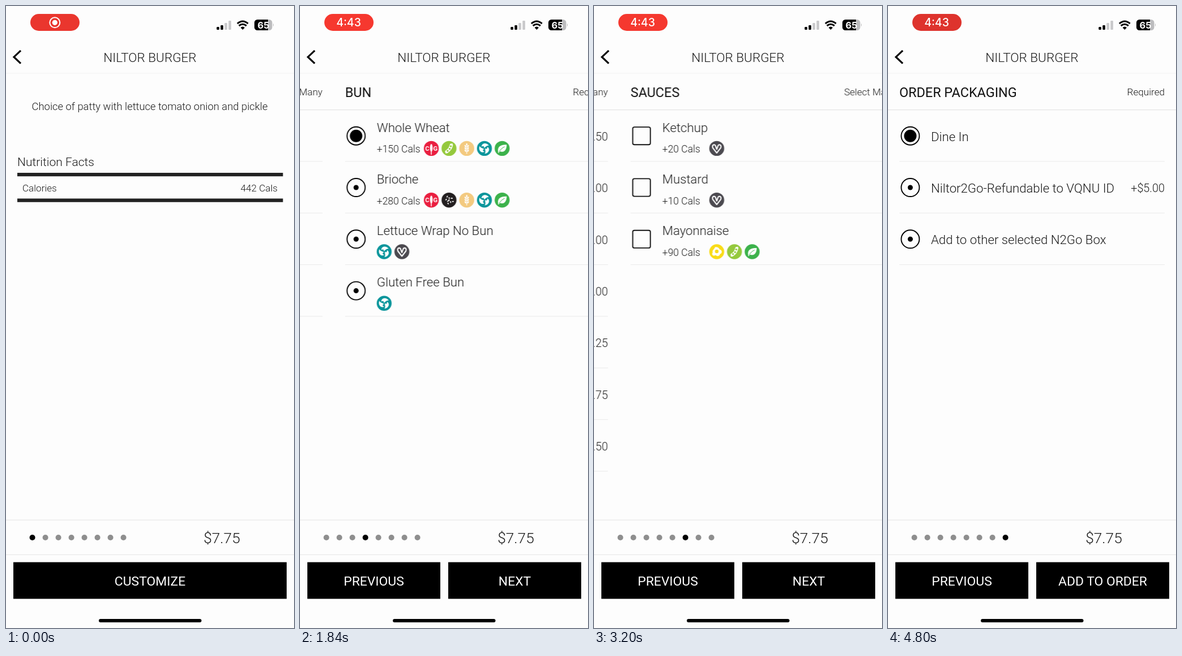
Write an HTML page that moves like this. It is 509x1100 px and loops after 4.88 s.

```html
<!DOCTYPE html>
<html lang="en">
<head>
<meta charset="utf-8">
<title>Burger order</title>
<style>
html, body { margin: 0; width: 100%; height: 100%; overflow: hidden; background: #fdfdfd; }
svg { display: block; width: 100%; height: 100%; }
text { font-family: Roboto, sans-serif; font-weight: 300; fill: #1c1c1c; }
.title { font-size: 22.5px; }
.name { font-size: 22.2px; }
.head { font-size: 23.4px; font-weight: 400; fill: #111; }
.desc { font-size: 18.4px; }
.cals { font-size: 17.5px; }
.note { font-size: 17.1px; }
.cost { font-size: 19.8px; }
.facts { font-size: 21px; }
.total { font-size: 26.3px; }
.button { font-size: 22.9px; font-weight: 400; fill: #fff; }
.clock { font: 500 19.5px Inter, sans-serif; fill: #fff; }
.charge { font: 700 16.5px Inter, sans-serif; fill: #fff; }
.letter { font: 700 11px Roboto, sans-serif; fill: #fff; }
</style>
</head>
<body>
<svg id="stage" viewBox="0 0 509 1100"></svg>
<script>
const LOOP = 4880, WIDTH = 509, SLIDE = 300;
const TOP = 183.5, ROW = 91.3;
const starts = Array.from({ length: 7 }, (_, i) => 316.3 + 672.9 * i);

const text = (x, y, cls, str, anchor = 'start') =>
  `<text x="${x}" y="${y}" class="${cls}" text-anchor="${anchor}">${str}</text>`;
const rect = (x, y, w, h, fill, r = 0, extra = '') =>
  `<rect x="${x}" y="${y}" width="${w}" height="${h}" rx="${r}" fill="${fill}" ${extra}/>`;
const circle = (x, y, r, fill, extra = '') =>
  `<circle cx="${x}" cy="${y}" r="${r}" fill="${fill}" ${extra}/>`;
const path = (d, fill = '#fff', extra = '') => `<path d="${d}" fill="${fill}" ${extra}/>`;
const line = (d, width, color = '#fff') =>
  path(d, 'none', `stroke="${color}" stroke-width="${width}" stroke-linecap="round" stroke-linejoin="round"`);
const turn = (angle, body) => `<g transform="rotate(${angle})">${body}</g>`;
const grain = (x, y, angle, rx = 1.2, ry = 2.2) =>
  `<ellipse rx="${rx}" ry="${ry}" fill="#fff" transform="translate(${x} ${y}) rotate(${angle})"/>`;

const wheat = line('M0 -4V9', 1.2) + grain(0, -7, 0) +
  [-4, 0, 4].map(y => grain(-2.3, y, -30) + grain(2.3, y, 30)).join('');

const icons = {
  gluten: ['#ea1f40', text(-7.2, 4, 'letter', 'C', 'middle') + text(7.2, 4, 'letter', 'G', 'middle') +
    grain(0, -1, 0, 2.3, 7) + line('M0 5V10.5', 1.5)],
  soy: ['#95c93d', turn(35, line('M0 -7Q3 0 0 7', 5.6) + line('M0 -10V-7M0 7V10', 1.3) +
    [-5, 0, 5].map(y => circle(y ? 0.4 : 1.4, y, 1.7, '#95c93d')).join(''))],
  wheat: ['#f3ca80', wheat],
  swirl: ['#0a959b', [0, 120, 240].map(a =>
    turn(a, path('M-5 -3C-5 -10 4 -11 8 -5C4 -6 2 -2 -1 -1C0 -4 -2 -5 -5 -3Z'))).join('')],
  vegan: ['#4c4a50', line('M0 8L-7 -1C-9 -7 -3 -8.5 -2 -4L0 1.5L2 -4C3 -8.5 9 -7 7 -1Z', 2.1)],
  leaf: ['#3cb24b', path('M-7 6C-9 -3 -2 -7 8 -6.5C8 3 3 8 -4 5L-7 8.5Z') + line('M-5 5Q-1 -1 4 -3', 1, '#3cb24b')],
  milk: ['#f6727f', rect(-2, -9.5, 4, 3, '#fff', 0.8) + path('M-2 -5.5H2L4 -2V8Q4 9.5 2.5 9.5H-2.5Q-4 9.5 -4 8V-2Z')],
  egg: ['#f9dc17', path('M-3 -8C1 -9 4 -7 5 -4C10 -3 10 3 6 4C5 8 1 9 -2 6C-6 9 -10 5 -7 1C-9 -2 -5 -3 -3 -8Z') +
    circle(0, -0.5, 3.2, '#f9dc17')],
  sesame: ['#231f20', Array.from({ length: 9 }, (_, i) => {
    const a = i * 2.4, r = 2.6 * Math.sqrt(i);
    return grain(r * Math.cos(a), r * Math.sin(a), i * 55, 1, 1.7);
  }).join('')],
  well: ['#66c3b3', '']
};
const badge = (key, x, y) =>
  `<g transform="translate(${x} ${y})">${circle(0, 0, 13.2, icons[key][0])}${icons[key][1]}</g>`;

// Each row: name, calories, icon keys, price
const pages = [
  { head: 'CHOICE OF PATTY', radio: true, rows: [
    ['Beef', 292], ['Chipotle Black Bean', 170, 'gluten soy wheat swirl vegan'], ['Turkey', 240],
    ['Chicken Breast', 213, 'well', '1.00'], ['Norvel Beef Patty', 232, 'vegan', '2.00']] },
  { head: 'CUSTOMIZE', rows: [['No Lettuce'], ['No Tomato'], ['No Onion'], ['No Pickle']] },
  { head: 'BUN', radio: true, rows: [
    ['Whole Wheat', 150, 'gluten soy wheat swirl leaf'], ['Brioche', 280, 'gluten sesame wheat swirl leaf'],
    ['Lettuce Wrap No Bun', 0, 'swirl vegan'], ['Gluten Free Bun', 0, 'swirl']] },
  { head: 'EXTRAS', rows: [
    ['Extra Patty', 0, '', '4.50'], ['Add Cheddar Cheese', 120, 'milk leaf', '1.00'],
    ['Add Pepperjack Cheese', 74, 'milk leaf', '1.00'],
    ['Add American Cheese', 52, 'milk soy swirl leaf', '1.00'],
    ['Add Fried Egg', 70, 'egg leaf', '1.25'], ['Add Bacon', 109, '', '1.75'],
    ['Add Avocado', 39, 'vegan', '1.50']] },
  { head: 'SAUCES', rows: [
    ['Ketchup', 20, 'vegan'], ['Mustard', 10, 'vegan'], ['Mayonnaise', 90, 'egg soy leaf']] },
  { head: 'MAKE IT A COMBO', rows: [
    ['Whole Fruit + Drink', 0, '', '3.50'], ['French Fries + Drink', 322, 'soy swirl vegan', '3.50'],
    ['Curly Fries + Drink', 292, 'gluten soy wheat vegan', '3.50'], ['Serrano Pesto Veg + Drink', 0, '', '3.50']] },
  { head: 'ORDER PACKAGING', radio: true, rows: [
    ['Dine In'], ['Niltor2Go-Refundable to VQNU ID', 0, '', '5.00'], ['Add to other selected N2Go Box']] }
];

function drawRow([name, cals, keys, price], i, radio) {
  const y = TOP + ROW * i, mid = y + 46.2;
  const list = keys ? keys.split(' ') : [];
  const control = radio
    ? circle(39.4, mid, 16, 'none', 'stroke="#000" stroke-width="1.9"') + circle(39.4, mid, i ? 4.5 : 11, '#000')
    : rect(23.8, mid - 15.6, 31.2, 31.2, 'none', 3, 'stroke="#111" stroke-width="1.9"');
  return control +
    text(76, y + (cals || list.length ? 39 : 55), 'name', name) +
    (cals ? text(76, y + 75.8, 'cals', `+${cals} Cals`) : '') +
    list.map((key, n) => badge(key, (cals ? 172.3 : 89) + 31.3 * n, y + 68.4)).join('') +
    (price ? text(489, y + 54.6, 'cost', '+$' + price, 'end') : '') +
    rect(20, y + ROW - 0.5, 469, 1.1, '#ececec');
}

const drawPage = ({ head, radio, rows }, i) =>
  `<g transform="translate(${WIDTH * (i + 1)} 0)">` +
  text(20, 160.6, 'head', head) +
  text(489, 158, 'note', radio ? 'Required' : 'Select Many', 'end') +
  rect(0, TOP - 0.5, WIDTH, 1.2, '#e4e4e4') +
  rows.map((row, n) => drawRow(row, n, radio)).join('') + '</g>';

const intro =
  text(254, 184.3, 'desc', 'Choice of patty with lettuce tomato onion and pickle', 'middle') +
  text(20, 283.2, 'facts', 'Nutrition Facts') +
  rect(20, 295, 469.5, 6.2, '#222') + rect(20, 340.5, 469.5, 6.3, '#222') +
  text(29, 327.7, 'note', 'Calories') + text(480, 327.7, 'note', '442 Cals', 'end');

const statusBar =
  rect(43, 14, 87, 30, '#ff3a30', 15, 'id="pill"') +
  `<g id="record">${circle(86.3, 29.3, 9, 'none', 'stroke="#fff" stroke-width="2"')}${circle(86.3, 29.3, 4.6, '#fff')}</g>` +
  `<g id="clock">${text(86, 36.3, 'clock', '4:43', 'middle')}</g>` +
  [5, 8, 12, 16].map((h, i) => rect(372.3 + 7 * i, 42 - h, 4.6, h, i < 2 ? '#000' : '#c9c9cb', 1.2)).join('') +
  path('M418.3 42L414.6 38.2Q418.3 35 422 38.2Z', '#000') +
  path('M411.7 35Q418.3 29.4 424.9 35M408.9 31.2Q418.3 22.8 427.7 31.2', 'none', 'stroke="#000" stroke-width="3"') +
  `<clipPath id="full"><rect x="439" y="24" width="24" height="19"/></clipPath>` +
  rect(439, 24, 31.5, 19, '#bcbcbe', 5.5) + rect(439, 24, 31.5, 19, '#000', 5.5, 'clip-path="url(#full)"') +
  path('M472 30.5Q474.2 33.5 472 36.5Z', '#bcbcbe') +
  text(455, 39.5, 'charge', '65', 'middle');

const button = (id, x, w, label) =>
  `<g id="${id}">${rect(x, 983.6, w, 64.8, '#000')}${text(x + w / 2, 1024.8, 'button', label, 'middle')}</g>`;

document.getElementById('stage').innerHTML =
  rect(0, 0, WIDTH, 1100, '#fdfdfd') +
  `<g id="track">${intro}${pages.map(drawPage).join('')}</g>` +
  statusBar +
  path('M26 78.8L14 90.2L26 101.6', 'none', 'stroke="#000" stroke-width="3.2"') +
  text(254.5, 98.6, 'title', 'NILTOR BURGER', 'middle') +
  rect(0, 118.5, WIDTH, 1, '#f1f1f1') +
  rect(0, 908.5, WIDTH, 1.1, '#e7e7e7') + rect(0, 969.8, WIDTH, 1.1, '#e7e7e7') +
  Array.from({ length: 8 }, (_, i) => circle(46.6 + 23 * i, 940, 5, '#8e8e8e', 'class="dot"')).join('') +
  text(381.5, 950.2, 'total', '$7.75', 'middle') +
  button('customize', 13, 483, 'CUSTOMIZE') + button('previous', 13, 235, 'PREVIOUS') +
  button('next', 262, 235, 'NEXT') + button('add', 262, 235, 'ADD TO ORDER') +
  rect(164, 1084, 181.5, 6, '#000', 3);

const byId = id => document.getElementById(id);

// Steps are [time in ms, value, easing]
function play(el, property, steps) {
  const frames = steps.map(([time, value, easing = 'linear']) =>
    ({ offset: Math.min(time / LOOP, 1), [property]: value, easing }));
  el.animate(frames, { duration: LOOP, iterations: Infinity });
}

function show(el, from, to) {
  const steps = [[0, from > 0 ? 0 : 1]];
  if (from > 0) steps.push([from, 0], [from, 1]);
  if (to < LOOP) steps.push([to, 1], [to, 0]);
  steps.push([LOOP, to < LOOP ? 0 : 1]);
  play(el, 'opacity', steps);
}

const slideTo = i => `translateX(${-WIDTH * i}px)`;
play(byId('track'), 'transform', [
  [0, slideTo(0)],
  ...starts.flatMap((time, i) => [[time, slideTo(i), 'ease'], [time + SLIDE, slideTo(i + 1)]]),
  [LOOP, slideTo(7)]
]);

document.querySelectorAll('.dot').forEach((dot, i) => {
  const grey = '#8e8e8e', black = '#000', on = i ? starts[i - 1] : 0;
  const steps = i ? [[0, grey], [on, grey], [on, black]] : [[0, black]];
  if (i < 7) steps.push([starts[i], black], [starts[i] + 105, grey], [LOOP, grey]);
  else steps.push([LOOP, black]);
  play(dot, 'fill', steps);
});

play(byId('pill'), 'fill', Array.from({ length: 62 }, (_, i) => {
  const time = i * 80, glow = (1 - Math.cos((time - 480) / 2040 * 2 * Math.PI)) / 2;
  return [time, `rgb(${217 + 38 * glow}, ${50 + 8 * glow}, ${45 + 3 * glow})`];
}));

const last = starts[6];
show(byId('record'), 0, 800);
show(byId('clock'), 800, LOOP);
show(byId('customize'), 0, starts[0]);
show(byId('previous'), starts[0], LOOP);
show(byId('next'), starts[0], last);
show(byId('add'), last, LOOP);
</script>
</body>
</html>
```
